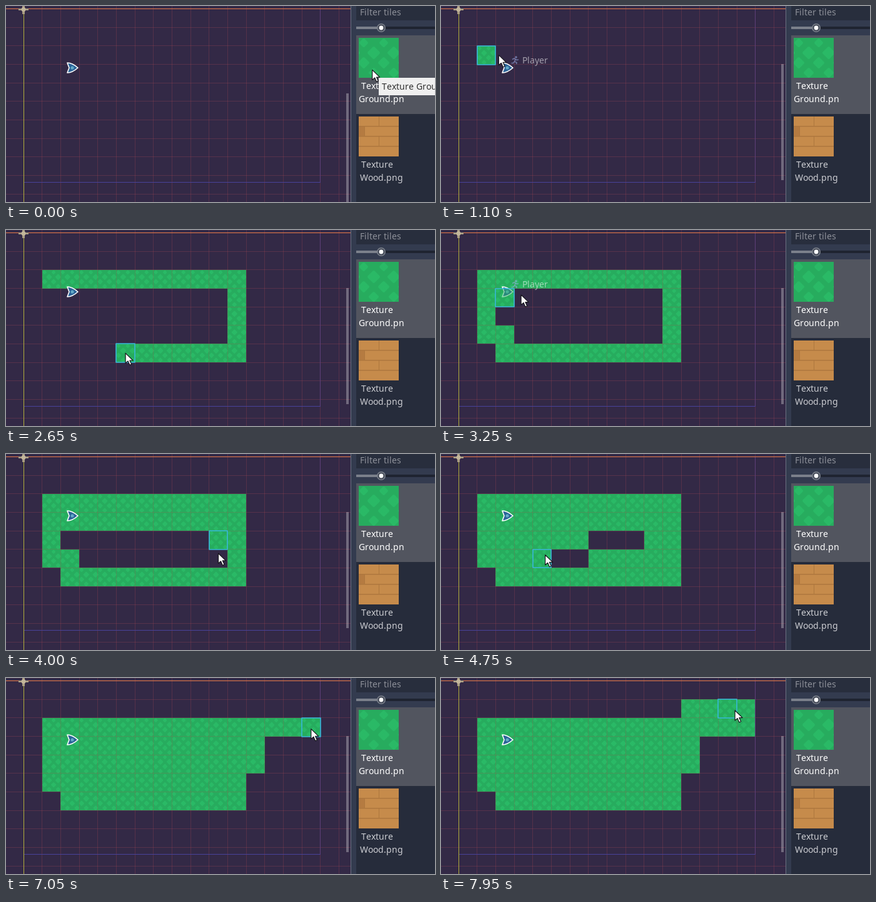
Recreate the animation shown at these times as an HTML page with a canvas. Size 686 px wide and 314 px high, loop 8000 ms.

```html
<!DOCTYPE html>
<html lang="en">
<head>
<meta charset="utf-8">
<title>Painting tiles</title>
<style>
html, body { margin: 0; width: 100%; height: 100%; overflow: hidden; background: #332946; }
canvas { display: block; }
</style>
</head>
<body>
<canvas id="stage" width="686" height="314"></canvas>
<script>
const g = document.getElementById('stage').getContext('2d');
const LOOP = 8000, FRAME = 50, LAG = 30, PAINT_START = 1070;
const CELL = 29.66, X0 = 28.1, Y0 = 4.53;

// Pointer strokes: start, end and moves in cells (left, right, up, down)
const strokes = [
  [400, 800, 'L16.5 UL.8'],
  [1050, 1200, 'R2'],
  [1600, 1850, 'R8'],
  [1850, 2080, 'D4'],
  [2080, 2400, 'L3'],
  [2450, 3250, 'L6 U1 L1 U2.15 R1.87'],
  [3300, 4100, 'R7.13 D2.15 L1'],
  [4150, 4860, 'L2 UL1 L4 D.8 R4'],
  [5000, 5750, 'R1 U1 R3'],
  [5850, 6650, 'R2 U1.7 R1'],
  [6700, 6900, 'R2'],
  [7050, 7650, 'U1 L3'],
  [7800, 7950, 'R2.4']
];
const legs = makeLegs([18.3, 2.8]);

function makeLegs(at) {
  const list = [];
  for (const [from, to, moves] of strokes) {
    const parts = moves.split(' ').map(m => {
      const dirs = m.match(/[A-Z]+/)[0];
      return { dirs, size: +m.slice(dirs.length) };
    });
    const pace = (to - from) / parts.reduce((sum, p) => sum + p.size, 0);
    let t = from;
    for (const { dirs, size } of parts) {
      const way = (plus, minus) => size * (dirs.includes(plus) - dirs.includes(minus));
      const move = [way('R', 'L'), way('D', 'U')];
      list.push({ t, time: size * pace, at, move });
      at = at.map((v, i) => v + move[i]);
      t += size * pace;
    }
  }
  return list;
}

// Pointer position in cells; whole numbers are cell centres
function pointerAt(t) {
  const leg = legs.findLast(l => l.t <= t) || legs[0];
  const p = Math.min(1, Math.max(0, (t - leg.t) / leg.time));
  return leg.at.map((v, i) => v + leg.move[i] * p);
}

const toPixels = ([c, r]) => [X0 + (c + .5) * CELL, Y0 + (r + .5) * CELL];
const colX = c => Math.round(X0 + c * CELL);
const rowY = r => Math.round(Y0 + r * CELL);

function rect(color, x, y, w, h) {
  g.fillStyle = color;
  g.fillRect(x, y, w, h);
}

function disc(color, x, y, r) {
  g.fillStyle = color;
  g.beginPath();
  g.arc(x, y, r, 0, 7);
  g.fill();
}

// Each letter advances by a whole number of pixels
function text(s, x, y, color) {
  g.font = '14px "Noto Sans", "Open Sans", sans-serif';
  g.fillStyle = color;
  for (const letter of s) {
    g.fillText(letter, x, y);
    x += Math.round(g.measureText(letter).width);
  }
}

function makeGround() {
  const tile = document.createElement('canvas');
  tile.width = tile.height = 64;
  const c = tile.getContext('2d');
  c.fillStyle = '#27ac5e';
  c.fillRect(0, 0, 64, 64);
  c.fillStyle = c.strokeStyle = '#2ab966';
  c.lineJoin = 'round';
  c.lineWidth = 4;
  for (let row = 0; row < 4; row++)
    for (let col = -1; col < 3; col++) {
      const x = col * 32 + row % 2 * 16 + 8, y = row * 16 + 8;
      const r = 5 + row * 3 % 4;
      c.beginPath();
      c.moveTo(x - r, y);
      c.lineTo(x, y - r);
      c.lineTo(x + r, y);
      c.lineTo(x, y + r);
      c.closePath();
      c.fill();
      c.stroke();
    }
  return tile;
}
const ground = makeGround();

function drawTile(c, r) {
  const x = colX(c), y = rowY(r);
  g.drawImage(ground, x, y, colX(c + 1) - x, rowY(r + 1) - y);
}

function drawTiles(until) {
  const done = new Set();
  for (let t = PAINT_START; t <= until; t += 10) {
    const cell = pointerAt(t).map(Math.round), key = cell.join();
    if (!done.has(key)) drawTile(...cell);
    done.add(key);
  }
}

function drawGrid(color) {
  for (let n = 1; n < 18; n++) {
    rect(color, Math.floor(X0 + n * CELL), 0, 1, 314);
    rect(color, 0, Math.floor(Y0 + n * CELL), 551, 1);
  }
}

function drawAxes() {
  rect('#5f3e78', 502, 5, 1, 278);
  rect('#48429a', 28, 282, 475, 1);
  rect('#ec7d4a', 0, 4, 551, 1);
  rect('#b3ae3c', 28, 0, 1, 314);
  rect('#a99c83', 20, 4, 16, 3);
  rect('#a99c83', 26, 0, 4, 13);
  disc('#c3b69b', 28, 5.5, 3.5);
}

const shipPath = new Path2D('M98 91Q106 91 115 99Q106 107 98 107L101 99Z');
const runnerPath = new Path2D('M114 85.5L117 84L121 86.5L124 86M119 86L117.5 89L121 90.5L120.5 93M117.5 89L115.5 91.5L112.5 91.5');
const arrowPath = new Path2D('M0 0V16L4 12.6L6.8 19L9.6 17.8L6.8 11.7H12Z');

function drawPath(path, fill, stroke, width) {
  g.lineJoin = 'round';
  g.fillStyle = fill;
  g.strokeStyle = stroke;
  g.lineWidth = width;
  g.fill(path);
  g.stroke(path);
}

function drawPlayer() {
  drawPath(shipPath, '#2b6397', '#fff', 1.6);
  disc('#62a9c6', 106, 99, 2.6);
}

function drawLabel() {
  g.save();
  g.globalAlpha = .55;
  drawPath(runnerPath, 'transparent', '#9fb4f0', 1.6);
  disc('#9fb4f0', 120, 82, 1.8);
  text('Player', 130, 92, '#fff');
  g.restore();
}

function drawHover([c, r]) {
  const x = colX(c), y = rowY(r);
  g.globalAlpha = .5;
  drawTile(c, r);
  g.globalAlpha = 1;
  g.strokeStyle = '#36bbdc';
  g.lineWidth = 1.6;
  g.strokeRect(x, y, colX(c + 1) - x, rowY(r + 1) - y);
}

function drawWood(x, y) {
  rect('#c68b4b', x, y, 64, 64);
  rect('#b57b41', x, y + 16, 9, 16);
  for (let row = 0; row < 3; row++) {
    rect('#ae773e', x, y + row * 16 + 15, 64, 1.5);
    rect('#ae773e', x + (row % 2 ? 9 : 32), y + row * 16, 1, 16);
  }
}

function drawPanel() {
  rect('#333b4f', 551, 0, 135, 314);
  rect('#6c7182', 551, 0, 1, 314);
  rect('#262c3b', 560, 47, 126, 267);
  rect('#282e3d', 560, 0, 126, 23);
  text('Filter tiles', 566, 15, '#8d9099');
  rect('#1f2431', 560, 33, 126, 4);
  rect('#7b808b', 560, 33, 40, 4);
  disc('#7b808b', 600, 35, 7);
  disc('#434957', 600, 35, 5.5);
  disc('#fff', 600, 35, 3.4);
  rect('#52555f', 560, 47, 126, 126);
  g.drawImage(ground, 564, 51);
  text('Texture', 568, 133, '#fff');
  text('Ground.pn', 564, 154, '#fff');
  drawWood(564, 177);
  text('Texture', 568, 259, '#cbccd1');
  text('Wood.png', 566, 280, '#cbccd1');
}

function drawTooltip() {
  rect('#efefef', 596, 115, 90, 28);
  text('Texture Ground.png', 601, 134, '#303030');
}

function drawPointer(x, y) {
  g.save();
  g.translate(x, y);
  drawPath(arrowPath, '#fff', '#16161c', 1.2);
  g.restore();
}

function draw(now) {
  const t = Math.floor(now % LOOP / FRAME) * FRAME;
  const [x, y] = toPixels(pointerAt(t));
  const hover = pointerAt(t - LAG).map(Math.round); // the cell marker trails slightly
  rect('#332946', 0, 0, 686, 314);
  drawGrid('rgba(255,255,255,.03)');
  drawTiles(t - LAG);
  drawGrid('rgba(200,60,70,.2)');
  drawAxes();
  drawPlayer();
  if (colX(hover[0]) < 551) drawHover(hover);
  if (Math.hypot(x - 106, y - 99) < 26) drawLabel();
  const [top, bottom] = t < 1100 ? [140, 314] : [93, 279];
  rect('rgba(255,255,255,.3)', 544, top, 4, bottom - top);
  drawPanel();
  if (t < 450) drawTooltip();
  drawPointer(x, y);
}

const start = performance.now();
function tick() {
  draw(performance.now() - start);
  requestAnimationFrame(tick);
}
tick();
</script>
</body>
</html>
```
